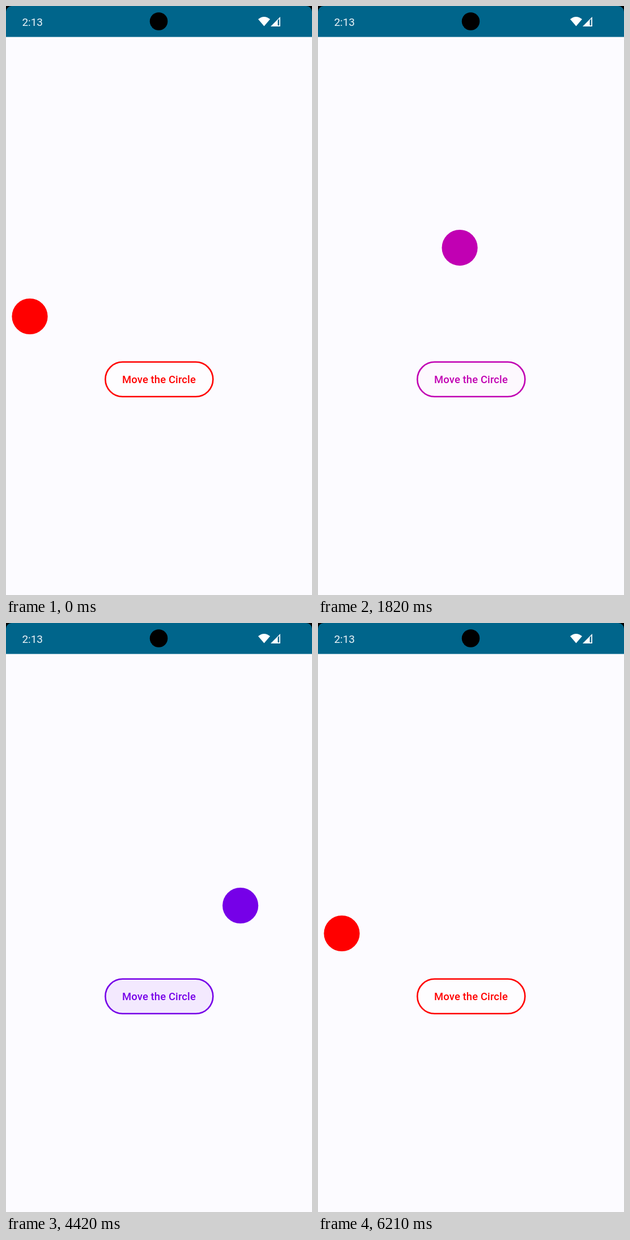
Write an HTML page that moves like this. It is 540 px wide and 1037 px high and loops after 6.3 s.

```html
<!DOCTYPE html>
<html lang="en">
<head>
<meta charset="utf-8">
<title>Move the Circle</title>
<style>
  html, body { margin: 0; height: 100%; overflow: hidden; background: #fcfbff; }
  svg { display: block; width: 540px; height: 1037px; font-family: Roboto, sans-serif; }
</style>
</head>
<body>
<svg viewBox="0 0 540 1037">
  <defs>
    <clipPath id="pill"><rect x="175.3" y="626.8" width="190" height="61" rx="30.5"/></clipPath>
  </defs>
  <rect width="540" height="1037" fill="#fcfbff"/>
  <rect width="540" height="20"/>
  <path d="M0 54.5V10A10 10 0 0 1 10 0H530A10 10 0 0 1 540 10V54.5Z" fill="#00658b"/>
  <circle cx="269.5" cy="27" r="15.8"/>
  <text x="28.4" y="35" font-size="19" fill="#eef6f9">2:13</text>
  <g fill="#fff">
    <path d="M455.5 35.6L445 23.3Q455.5 14.7 466 23.3Z"/>
    <path fill-rule="evenodd" d="M467 36L484 19V36ZM479.6 25.2V34.2H482.2V22.6Z"/>
  </g>
  <g id="tinted">
    <rect x="175.3" y="626.8" width="190" height="61" rx="30.5" fill="#fefdff"/>
    <circle id="ripple" cx="270" cy="657" clip-path="url(#pill)"/>
    <rect x="175.3" y="626.8" width="190" height="61" rx="30.5"
          fill="none" stroke="currentColor" stroke-width="2.6"/>
    <text x="270" y="664" font-size="18.4" font-weight="500" letter-spacing=".13"
          text-anchor="middle" fill="currentColor">Move the Circle</text>
    <circle id="ball" r="31.6" fill="currentColor"/>
    <!-- ripple follows the current tint -->
  </g>
</svg>
<script>
const LOOP = 6300, MOVE = 2000, FORWARD = 1155, BACK = 3967;
const PRESS_LEAD = 80, RIPPLE_IN = 450, RIPPLE_OUT = 375;
const [tinted, ripple, ball] = ['tinted', 'ripple', 'ball'].map(id => document.getElementById(id));
const clamp = v => Math.min(1, Math.max(0, v));

// cubic-bezier(.4, 0, .2, 1)
function ease(x) {
  let lo = 0, hi = 1;
  for (let i = 0; i < 24; i++) {
    const s = (lo + hi) / 2, r = 1 - s;
    if (1.2 * r * r * s + 0.6 * r * s * s + s ** 3 < x) lo = s; else hi = s;
  }
  return lo * lo * (3 - 2 * lo);
}

const travel = (time, start) => ease(clamp((time - start) / MOVE));
const channel = v => Math.round(255 * clamp(v) ** (1 / 2.2));

function draw(now) {
  const time = now % LOOP;
  let p = travel(time, FORWARD) - travel(time, BACK);
  if (p < 1e-5) p = 0;
  if (p > 1 - 1e-5) p = 1;

  ball.setAttribute('cx', 42 + 456 * p);
  ball.setAttribute('cy', 546.5 - 132.5 * (1 - Math.abs(2 * p - 1)));
  tinted.style.color = `rgb(${channel(1 - p)}, 0, ${channel(p)})`;

  const age = time - (time < BACK - PRESS_LEAD ? FORWARD : BACK) + PRESS_LEAD;
  const grow = clamp(age / RIPPLE_IN);
  const fade = 1 - clamp((age - RIPPLE_IN) / RIPPLE_OUT);
  ripple.setAttribute('r', 100 * (1 - (1 - grow) ** 2));
  ripple.setAttribute('fill', 'currentColor');
  ripple.setAttribute('fill-opacity', 0.1 * clamp(grow * 4) * fade);

  requestAnimationFrame(draw);
}
draw(performance.now());
</script>
</body>
</html>
```
